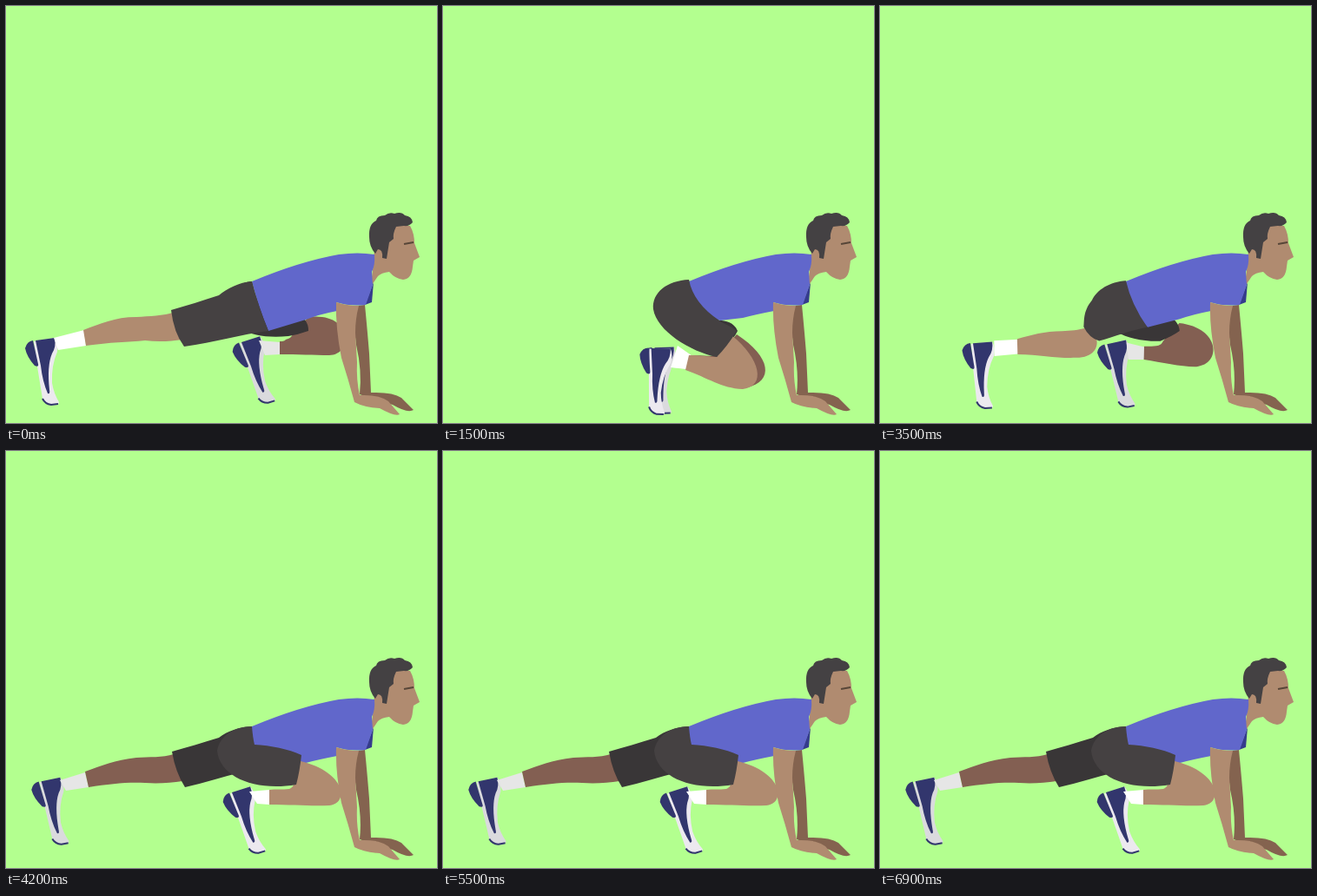
These frames come from a looping animation (496x480 px, 7 s). An HTML page:

```html
<!DOCTYPE html>
<html lang="en">
<head>
<meta charset="utf-8">
<title>Mountain climber</title>
<style>
html, body { margin: 0; width: 100%; height: 100%; overflow: hidden; background: #b3ff8f; }
svg { display: block; width: 496px; height: 480px; }
</style>
</head>
<body>
<svg viewBox="0 0 496 480">
  <defs>
    <g id="shoe">
      <path d="M10-4L34-8Q38-2 37 8Q30 24 31 44Q33 56 39 66Q39 70 30 69Q22 68 20 62L14 25Z"/>
      <path fill="#32366d" d="M0 4Q2-4 9-5L15 22Q16 26 11 24Q2 14 0 4ZM12-5L34-8Q36 2 31 10Q25 24 28 52Q29 57 26 56Q20 42 18 24Z"/>
      <path fill="none" stroke="#32366d" stroke-width="2" d="M20 62Q23 68 30 69L38 68"/>
    </g>
  </defs>
  <g id="far">
    <use href="#shoe" fill="#dadadd"/>
    <path fill="#e6e6e6"/><path fill="#835f52"/><path fill="#393637"/>
  </g>
  <path fill="#84634f" d="M398 346L413 344Q416 375 418 400L420 445Q445 444 455 451L469 465Q462 469 445 459L430 455L407 447Q410 420 403 390Z"/>
  <path fill="#353c8c" d="M413 344L421 341L423 318Z"/>
  <path fill="#b08b70" d="M436 262L447 253L465 253Q470 262 470 273L476 289L469 293L468 300Q467 314 457 315Q448 314 441 306Q432 307 428 311L419 324Q423 303 424 278Z"/>
  <path fill="#444143" d="M418 266Q417 251 426 247Q427 241 436 241Q441 237 447 239Q455 236 459 241Q467 242 468 249Q464 254 458 253L449 254Q445 262 446 268L441 272L438 291L433 290Q434 280 428 280L425 285Q418 277 418 266Z"/>
  <path fill="none" stroke="#574638" stroke-width="2" d="M458 274L469 272"/>
  <path id="shirt" fill="#6167cb"/>
  <g id="near">
    <use href="#shoe" fill="#ece9ef"/>
    <path fill="#fff"/><path fill="#b08b70"/><path fill="#454142"/>
  </g>
  <path fill="#b08b70" d="M380 341Q392 345 406 345Q402 360 402 376L404 410Q403 430 407 448Q430 447 440 455L453 470Q448 473 430 463Q412 462 401 456Q394 430 386 405Q379 370 380 341Z"/>
</svg>
<script>
const LOOP = 7000, SWITCH = 620, STEP = 100;

// Each part has three poses: leg back, tucked, leg forward.
const near = {
  shoe: ["translate(22 390) rotate(0)", "translate(227 397) rotate(9)", "translate(249 400) rotate(-10)"],
  parts: [
    ["M55 382L90 373L92 391L60 396Z",
     "M270 391L287 403L280 418L262 416Z",
     "M280 392L303 390L303 407L289 406Z"],
    ["M195 352C180 357 165 357 150 358C125 358 108 366 89 373L92 391C120 387 140 387 160 385C175 387 190 386 203 384Z",
     "M315 403C316 404 317 404 318 404C305 404 295 402 283 402L279 419C305 428 320 440 345 441C372 438 366 406 332 379Z",
     "M331 384C330 387 328 388 326 389C318 390 310 389 303 390L303 407C330 407 350 409 372 408C395 406 392 370 339 357Z"],
    ["M283 317C268 318 255 325 245 333C226 339 208 345 190 350Q193 376 205 392C240 387 270 378 302 374Q290 345 283 317Z",
     "M283 315C258 316 240 330 242 349C246 374 285 398 315 404Q327 392 338 374C330 367 320 365 318 362Q288 342 283 315Z",
     "M283 317C262 317 246 328 243 345C246 376 288 392 334 384Q338 369 340 350C325 343 305 339 286 338Q284 330 283 317Z"]
  ]
};
const far = {
  shoe: ["translate(29 386) rotate(-4)", "translate(231 397) rotate(6)", "translate(260 394) rotate(-10)"],
  parts: [
    ["M62 379L91 370L95 387L69 391Z",
     "M270 392L287 403L283 418L264 416Z",
     "M291 385L315 387L315 401L298 402Z"],
    ["M193 349C180 353 165 352 150 353C125 356 110 362 91 369L95 387C120 383 140 381 160 382C175 383 190 382 203 380Z",
     "M318 400C318 402 318 403 318 403C305 403 295 402 284 402L283 418C310 428 330 440 350 439C381 432 378 404 338 378Z",
     "M330 378C328 382 325 383 322 384C320 386 318 386 315 386L315 401C335 401 355 402 372 402C400 402 400 352 348 358Z"],
    ["M283 317C268 318 255 322 245 330C226 336 208 341 191 346Q195 370 206 387C228 382 250 375 270 370Q290 345 283 317Z",
     "M283 316C258 318 244 330 246 349C248 370 285 392 318 396Q335 384 339 374C335 364 325 362 318 362Q288 340 283 316Z",
     "M283 317C268 318 254 328 255 345C256 372 285 384 325 380Q337 378 348 374C350 356 320 340 290 340Q285 328 283 317Z"]
  ]
};
const shirtPath = hem =>
  `M283 317Q338 294 383 286Q405 283 424 286Q425 298 421 306L422 321L414 344Q396 346 380 341L381 351Q360 355 345 ${hem}Z`;
const shirt = [
  shirtPath("361L302 374Q290 345 283 317"),
  shirtPath("359L319 362Q278 350 283 317"),
  shirtPath("359L319 362Q268 345 283 317")
];

// Blends the numbers of two neighbouring poses.
function blend(poses, s) {
  const i = Math.min(1, Math.floor(s)), k = s - i;
  const next = poses[i + 1].match(/-?[\d.]+/g);
  let n = 0;
  return poses[i].replace(/-?[\d.]+/g, v => +v + (next[n++] - v) * k);
}

// 0 = near leg back, 1 = both tucked, 2 = near leg forward.
// The legs rest around every whole beat and tuck quickly halfway between.
function stance(time) {
  const beat = time / SWITCH, rest = Math.round(beat);
  const tuck = Math.max(0, Math.min(1, (Math.abs(beat - rest) - 0.33) / 0.07));
  return rest % 2 ? 2 - tuck : tuck;
}

function drawLeg(id, leg, s) {
  const [shoe, ...paths] = document.getElementById(id).children;
  shoe.setAttribute("transform", blend(leg.shoe, s));
  paths.forEach((path, i) => path.setAttribute("d", blend(leg.parts[i], s)));
}

function draw() {
  const s = stance(Math.floor(performance.now() % LOOP / STEP) * STEP);
  drawLeg("far", far, 2 - s);
  drawLeg("near", near, s);
  document.getElementById("shirt").setAttribute("d", blend(shirt, s));
  requestAnimationFrame(draw);
}
draw();
</script>
</body>
</html>
```
